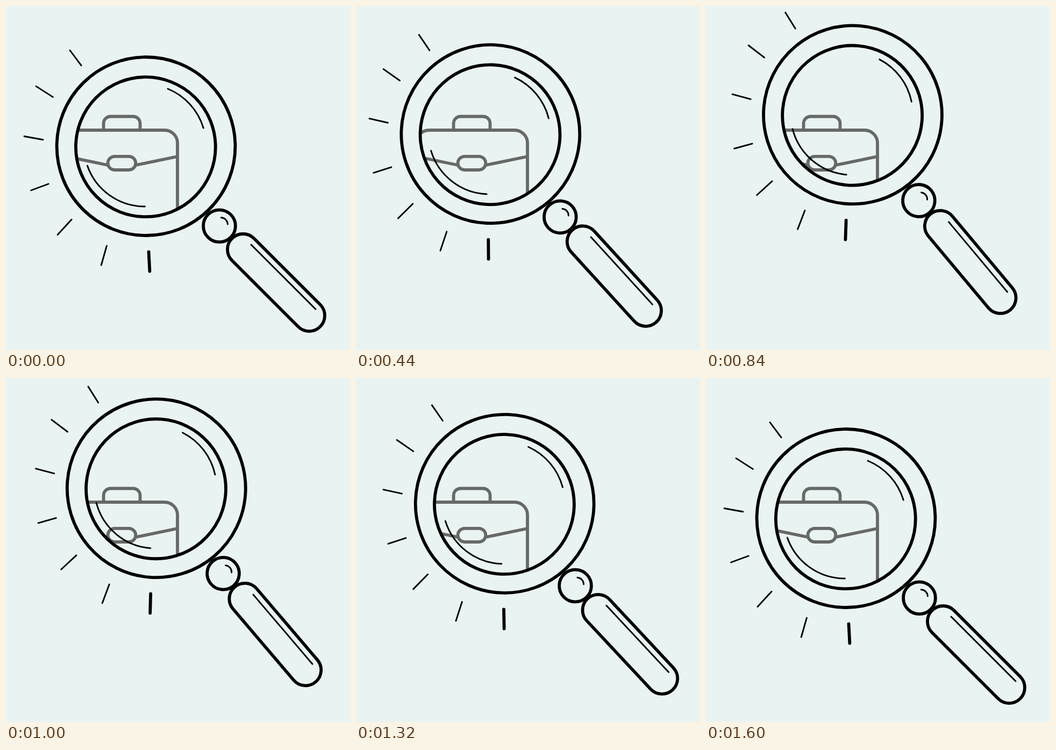
Recreate the animation shown at these times as an HTML page. Size 640 by 640 pixels, loop 1.64 s.

```html
<!DOCTYPE html>
<html lang="en">
<head>
<meta charset="utf-8">
<title>Job search</title>
<style>
  html, body { margin: 0; width: 100%; height: 100%; overflow: hidden; background: #e9f3f2; }
  svg { display: block; width: 100%; height: 100%; }
  path, circle, rect { fill: none; stroke: #000; stroke-width: 5.8; stroke-linecap: round; stroke-linejoin: round; }
  .thin { stroke-width: 2.9; }
  .case * { stroke: #676968; }
</style>
</head>
<body>
<svg viewBox="0 0 640 640">
  <clipPath id="glass"><circle id="hole" r="130"/></clipPath>
  <g class="case" clip-path="url(#glass)">
    <path d="M112 430V255a24 24 0 0 1 24-24H295a24 24 0 0 1 24 24V430"/>
    <path d="M181.5 230V218.5a13 13 0 0 1 13-13h42a13 13 0 0 1 13 13V230"/>
    <path d="M112 280L189.5 296M319 280L241.5 296"/>
    <rect x="189.5" y="279.8" width="51.8" height="25.2" rx="12.6"/>
  </g>
  <!-- Drawn around the centre of the outer ring -->
  <g id="lens">
    <circle r="166"/>
    <circle cx="-.7" cy="1.2" r="130"/>
    <g transform="translate(-260.5 -261)">
      <path class="thin" d="M301 154A114.5 114.5 0 0 1 367.3 227M151.3 297A113.5 113.5 0 0 0 258.5 373"/>
      <circle cx="397" cy="409.2" r="29.9"/>
      <path class="thin" d="M400.3 393.8A12.3 12.3 0 0 1 412.4 406"/>
      <rect x="-29" y="-29" width="232" height="58" rx="29" transform="translate(441 453) rotate(45)"/>
      <path class="thin" d="M456 444L576 564"/>
      <path class="thin" d="M119 82.5L140 110.7M56 149.4L87.3 169.4M34 242.5L68.8 248.8M46.5 343L79 331M96 425.5L122 397.2M177.2 482L187.4 446.2"/>
      <path d="M265.5 457.5L267.4 493.5"/>
    </g>
  </g>
</svg>
<script>
const CYCLE = 1600, LOOP = 1640, STEP = 40;

// time, x, y, angle: a closed path
const poses = [
  [0, 260.5, 261, 0],
  [240, 249.8, 257.2, 1],
  [600, 257, 220.2, 3.9],
  [840, 273, 202.4, 5.05],
  [1160, 281, 217.2, 3.36],
  [1440, 270.5, 247, .92]
];
const count = poses.length;
const wrap = i => (i + count) % count;
const times = poses.map(p => p[0]);
const gaps = times.map((t, i) => (i + 1 < count ? times[i + 1] : CYCLE) - t);

// Smooth periodic cubic through one column of the table
function spline(col) {
  const v = poses.map(p => p[col]);
  const slope = v.map((a, i) => (v[wrap(i + 1)] - a) / gaps[i]);
  const m = v.map(() => 0);
  for (let pass = 0; pass < 40; pass++) {
    for (let i = 0; i < count; i++) {
      const p = wrap(i - 1), n = wrap(i + 1), a = gaps[p], b = gaps[i];
      m[i] = (3 * (b * slope[p] + a * slope[i]) - b * m[p] - a * m[n]) / (2 * (a + b));
    }
  }
  return t => {
    const i = times.findLastIndex(k => k <= t), n = wrap(i + 1), h = gaps[i];
    const u = (t - times[i]) / h, w = 1 - u;
    return v[i] * w * w * (1 + 2 * u) + v[n] * u * u * (1 + 2 * w)
      + h * u * w * (m[i] * w - m[n] * u);
  };
}

const [xAt, yAt, angleAt] = [1, 2, 3].map(spline);
const lens = document.getElementById('lens');
const hole = document.getElementById('hole');

function draw(now) {
  const t = Math.floor((now % LOOP) / STEP) * STEP % CYCLE;
  const move = `translate(${xAt(t)} ${yAt(t)}) rotate(${angleAt(t)})`;
  lens.setAttribute('transform', move);
  hole.setAttribute('transform', move + ' translate(-.7 1.2)');
}

let start;
function tick(now) {
  start ??= now;
  draw(now - start);
  requestAnimationFrame(tick);
}
draw(0);
requestAnimationFrame(tick);
</script>
</body>
</html>
```
